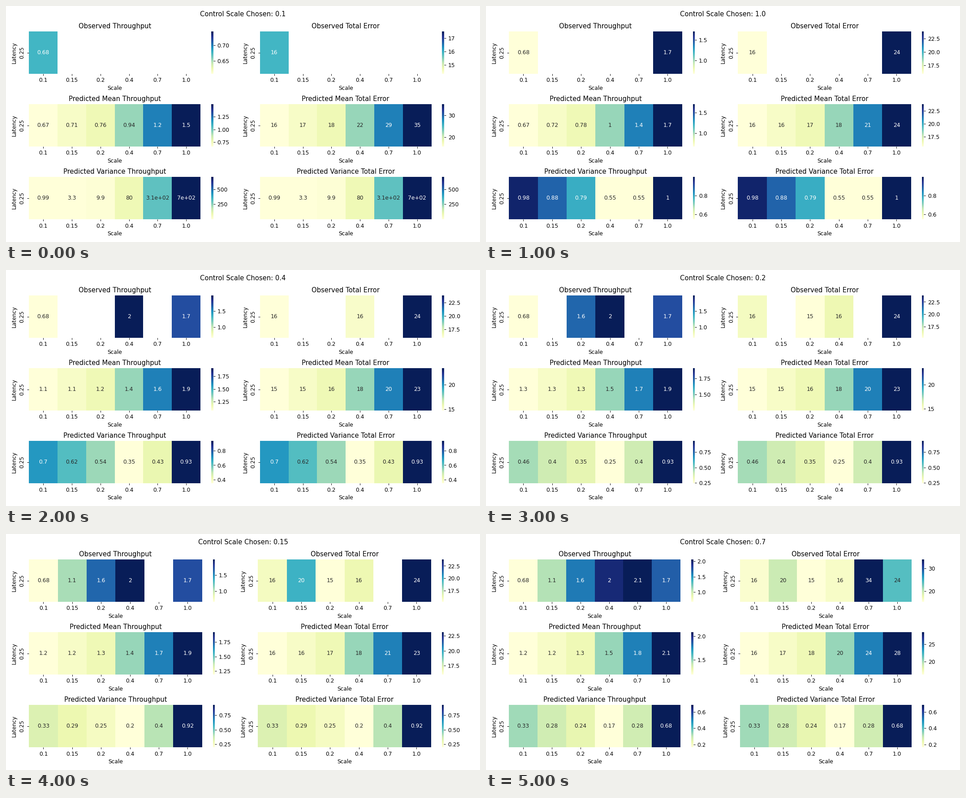
A matplotlib script that plays this animation: 1058x529 px, repeating every 6000 ms.

```python
import numpy as np
import matplotlib.pyplot as plt
from matplotlib.animation import FuncAnimation

WIDTH, HEIGHT = 1058, 529
SCALES = np.array([0.1, 0.15, 0.2, 0.4, 0.7, 1.0])
CHOSEN = [0.1, 1.0, 0.4, 0.2, 0.15, 0.7]

# Measurements revealed one at a time, in the order of CHOSEN.
OBSERVED = [
    np.array([0.676, 1.07, 1.62, 1.97, 2.06, 1.71]),
    np.array([15.91, 19.65, 15.27, 16.3, 33.8, 23.78]),
]
# The predicted means are linear in scale: (value at 0.1, value at 1.0) per step.
MEAN_ENDS = [
    [(0.666, 1.494), (0.667, 1.705), (1.073, 1.909),
     (1.254, 1.91), (1.188, 1.92), (1.196, 2.079)],
    [(15.67, 35.15), (15.65, 23.79), (14.70, 23.36),
     (14.63, 23.38), (16.0, 23.1), (16.35, 28.45)],
]
VARIANCE = [
    [0.99, 3.3, 9.9, 80, 310, 702],
    [0.98, 0.88, 0.787, 0.548, 0.549, 0.999],
    [0.70, 0.62, 0.54, 0.351, 0.43, 0.932],
    [0.46, 0.40, 0.35, 0.246, 0.40, 0.931],
    [0.33, 0.29, 0.25, 0.199, 0.40, 0.924],
    [0.33, 0.28, 0.24, 0.166, 0.28, 0.684],
]

# Panel geometry in pixels, y measured from the top.
ROW_TOPS = [57.3, 220.4, 383.5]
PANEL_HEIGHT = 94.5
NARROW = dict(lefts=(51.3, 566.8), width=382.7)
WIDE = dict(lefts=(51.3, 562.4), width=386.2)
LAYOUTS = [NARROW, WIDE, NARROW, WIDE, WIDE, NARROW]

fig = plt.figure(figsize=(12, 6), dpi=(WIDTH + 0.04) / 12)


def add_axes(left, top, width, height):
    return fig.add_axes([left / WIDTH, 1 - (top + height) / HEIGHT,
                         width / WIDTH, height / HEIGHT])


def luminance(rgba):
    rgb = np.array(rgba[:3])
    linear = np.where(rgb <= 0.03928, rgb / 12.92, ((rgb + 0.055) / 1.055) ** 2.4)
    return linear @ [0.2126, 0.7152, 0.0722]


def heatmap(values, title, left, top, width):
    low, high = np.nanmin(values), np.nanmax(values)
    if low == high:
        low, high = 0.9 * low, 1.1 * high

    ax = add_axes(left, top, width, PANEL_HEIGHT)
    mesh = ax.pcolormesh(np.ma.masked_invalid([values]), cmap="YlGnBu",
                         vmin=low, vmax=high)
    centers = np.arange(len(SCALES)) + 0.5
    for x, value in zip(centers, values):
        if np.isfinite(value):
            light = luminance(mesh.cmap(mesh.norm(value))) > 0.408
            ax.text(x, 0.5, f"{value:.2g}", ha="center", va="center",
                    color="0.15" if light else "w")
    ax.set(xlim=(0, len(SCALES)), ylim=(0, 1),
           title=title, xlabel="Scale", ylabel="Latency")
    ax.set_xticks(centers, [str(s) for s in SCALES.tolist()])
    ax.set_yticks([0.5], ["0.25"], rotation="vertical", va="center")
    ax.spines[:].set_visible(False)

    # The heatmap fills 80% of its slot; the bar follows after a 5% gap.
    bar_left = left + width * (1 + 0.05 / 0.8)
    cax = add_axes(bar_left, top, PANEL_HEIGHT / 20, PANEL_HEIGHT)
    fig.colorbar(mesh, cax=cax).outline.set_linewidth(0)


def update(step):
    fig.clear()
    fig.suptitle(f"Control Scale Chosen: {CHOSEN[step]}")
    layout = LAYOUTS[step]
    seen = np.isin(SCALES, CHOSEN[:step + 1])
    for col, metric in enumerate(("Throughput", "Total Error")):
        start, end = MEAN_ENDS[col][step]
        panels = [
            ("Observed", np.where(seen, OBSERVED[col], np.nan)),
            ("Predicted Mean", start + (end - start) * (SCALES - 0.1) / 0.9),
            ("Predicted Variance", np.array(VARIANCE[step])),
        ]
        for top, (kind, values) in zip(ROW_TOPS, panels):
            heatmap(values, f"{kind} {metric}", layout["lefts"][col], top,
                    layout["width"])
    return []


anim = FuncAnimation(fig, update, frames=len(CHOSEN), interval=1000,
                     repeat=True, repeat_delay=0, blit=False)
plt.show()
```
